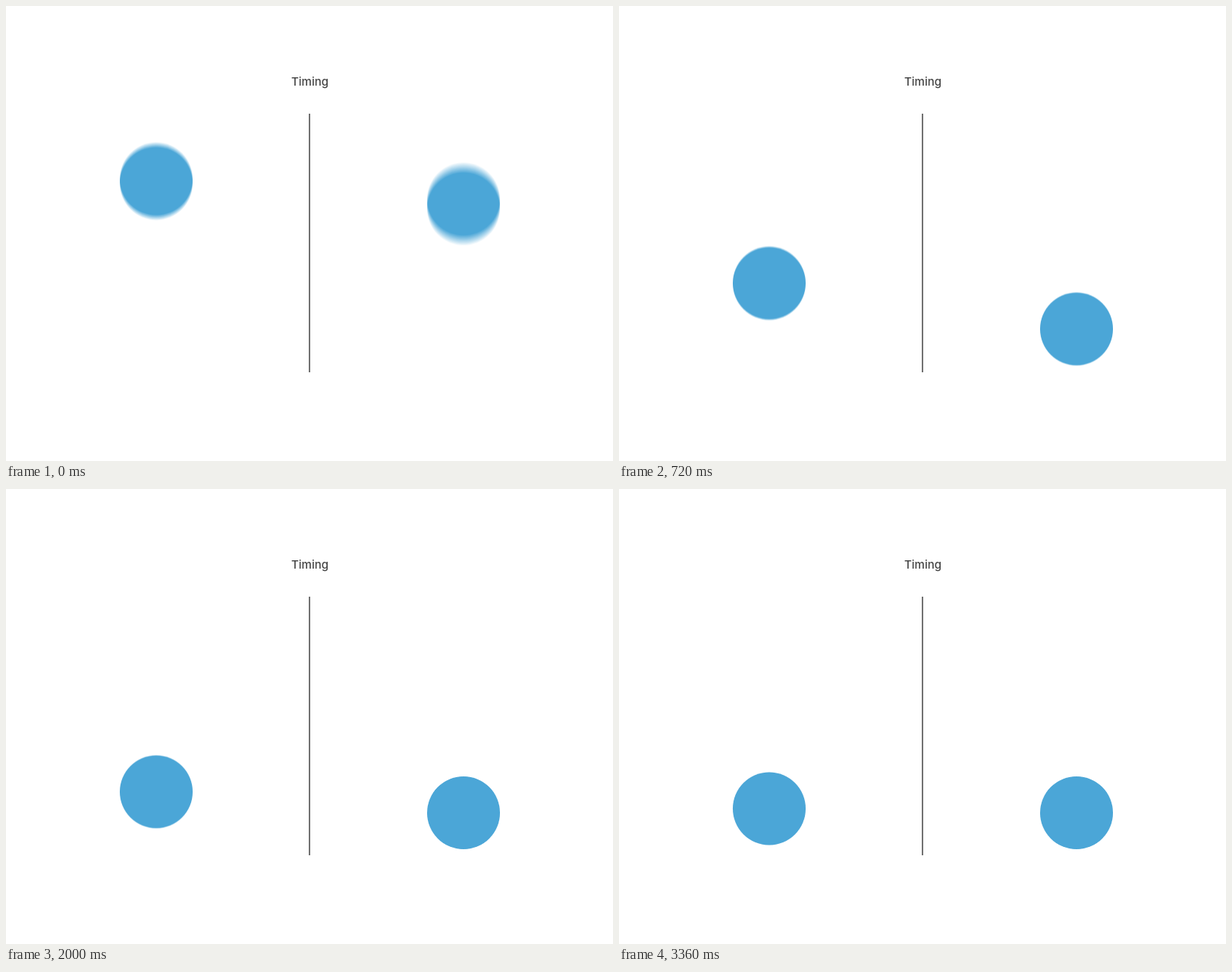
Animation, 800 px wide and 600 px high, one loop 3.4 s. Source, as an HTML page with a canvas:

```html
<!DOCTYPE html>
<html lang="en">
<head>
<meta charset="utf-8">
<title>Timing</title>
<style>
  html, body { margin: 0; width: 100%; height: 100%; overflow: hidden; background: #fff; }
  canvas { position: absolute; left: 0; top: 0; }
  h1 {
    position: absolute; left: 300px; top: 90px; width: 201px; margin: 0;
    font: 500 15px/20px Inter, Roboto, sans-serif; color: #444; text-align: center;
  }
  hr {
    position: absolute; left: 399px; top: 142px; width: 2px; height: 341px;
    margin: 0; border: 0; background: #727272;
  }
</style>
</head>
<body>
<h1>Timing</h1>
<hr>
<canvas id="stage" width="800" height="600"></canvas>
<script>
  const LOOP = 3400, STEP = 40;
  const FLOOR = 427, RADIUS = 48, GRAVITY = 4.15e-4;   // px and ms
  const SHUTTER = 17.6, SAMPLES = 17;
  const ctx = document.getElementById('stage').getContext('2d');

  // speed: steady fall; rebound: speed after the first hit; bounce: restitution of later hits
  const balls = [
    { x: 198, hit: 443, speed: 0.4425, rebound: 0.2793, bounce: 0.627 },
    { x: 603, hit: 200, speed: 0.83, rebound: 0.11, bounce: 0.13 }
  ];

  function height(ball, t) {
    let dt = t - ball.hit;
    if (dt < 0) return -dt * ball.speed;
    for (let v = ball.rebound; v > 1e-3; v *= ball.bounce) {
      const air = 2 * v / GRAVITY;
      if (dt < air) return v * dt - GRAVITY * dt * dt / 2;
      dt -= air;
    }
    return 0;
  }

  // Sum the coverage over the open shutter, then tint it.
  function draw(t) {
    ctx.clearRect(0, 0, 800, 600);
    ctx.globalCompositeOperation = 'lighter';
    ctx.globalAlpha = 1 / SAMPLES;
    ctx.fillStyle = '#000';
    for (const ball of balls) {
      for (let i = 0; i < SAMPLES; i++) {
        const when = t + ((i + 0.5) / SAMPLES - 0.5) * SHUTTER;
        ctx.beginPath();
        ctx.arc(ball.x, FLOOR - height(ball, when), RADIUS, 0, 2 * Math.PI);
        ctx.fill();
      }
    }
    ctx.globalCompositeOperation = 'source-in';
    ctx.globalAlpha = 1;
    ctx.fillStyle = '#4ba6d7';
    ctx.fillRect(0, 0, 800, 600);
    ctx.globalCompositeOperation = 'source-over';
  }

  const start = performance.now();
  function tick() {
    const t = (performance.now() - start) % LOOP;
    draw(Math.floor(t / STEP + 0.1) * STEP % LOOP);
    requestAnimationFrame(tick);
  }
  tick();
</script>
</body>
</html>
```
